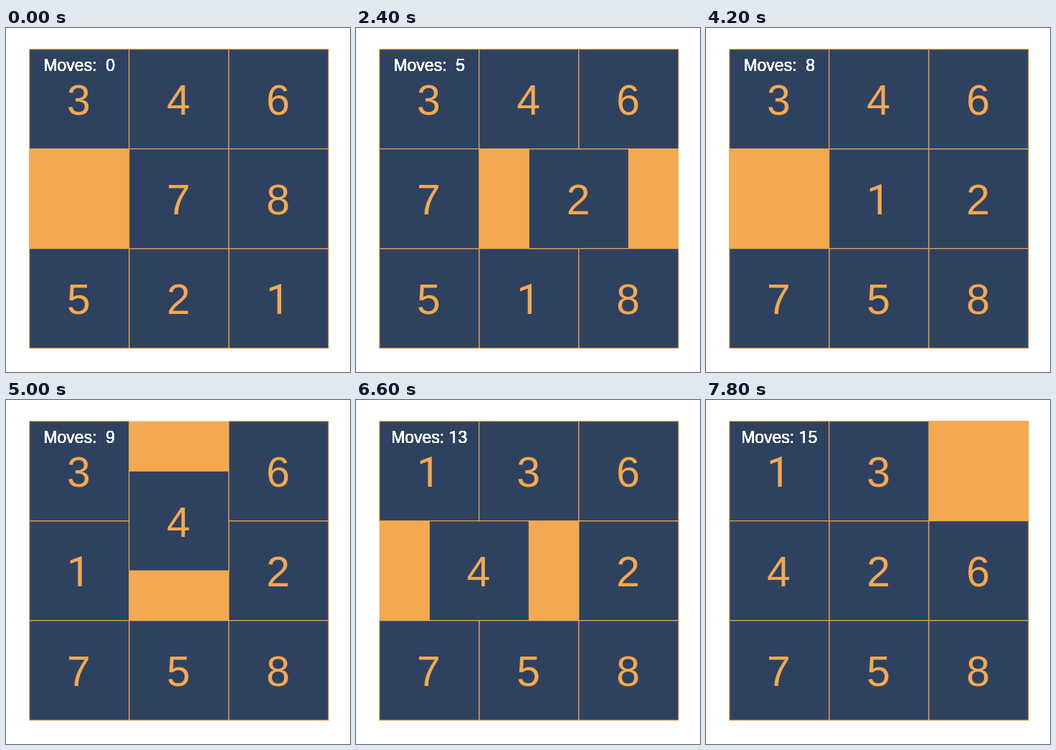
These frames come from a looping animation (480 px wide and 480 px high, 8000 ms). An HTML page with a canvas:

```html
<!DOCTYPE html>
<html lang="en">
<head>
<meta charset="utf-8">
<title>Sliding puzzle</title>
<style>
  html, body { margin: 0; width: 100%; height: 100%; overflow: hidden; background: #fff; }
  canvas { display: block; }
</style>
</head>
<body>
<canvas id="stage" width="480" height="480"></canvas>
<script>
const ctx = document.getElementById("stage").getContext("2d");
const ORANGE = "#f4a950", NAVY = "#2e4260";
const LEFT = 32.7, TOP = 29.6, CELL = 139.1;
const LOOP = 8000, STEP = 200;

// Tile 0 is the empty place; every move swaps it with the listed tile.
const START = [3, 4, 6, 0, 7, 8, 5, 2, 1];
const MOVES = [7, 2, 1, 8, 2, 1, 5, 7, 1, 4, 3, 1, 4, 2, 6];

const states = [START.map((_, tile) => START.indexOf(tile))];
for (const tile of MOVES) {
  const next = [...states.at(-1)];
  [next[0], next[tile]] = [next[tile], next[0]];
  states.push(next);
}

// Step at which a state is reached: moves take two or three steps.
const arrival = k => Math.round(2.625 * k + 0.1);

function elasticInOut(p) {
  if (p <= 0 || p >= 1) return p;
  const q = 2 * p - 1, w = 13 * Math.PI / 2;
  return p < 0.5
    ? 0.5 * Math.sin(w * 2 * p) * 2 ** (10 * q)
    : 0.5 * (Math.sin(-w * (q + 1)) * 2 ** (-10 * q) + 2);
}

// The counter shows the nearest state; exact ties go to the odd one.
function nearest(k, p) {
  if (p === 0.5) return k % 2 ? k : k + 1;
  return p < 0.5 ? k : k + 1;
}

// Centred text, with a footless "1".
function drawText(text, x, y, size) {
  const runs = text.split(/(1)/).filter(Boolean).map(run => {
    const font = `${size}px ${run === "1" ? "Roboto" : '"Liberation Sans"'}, sans-serif`;
    ctx.font = font;
    return { run, font, width: ctx.measureText(run).width };
  });
  x -= runs.reduce((sum, r) => sum + r.width, 0) / 2;
  for (const { run, font, width } of runs) {
    ctx.font = font;
    ctx.fillText(run, x, y);
    x += width;
  }
}

function drawStep(step) {
  let k = 0;
  while (k < MOVES.length && arrival(k + 1) <= step) k++;
  const p = (step - arrival(k)) / (arrival(k + 1) - arrival(k));
  const from = states[k], to = states[k + 1] || from, e = elasticInOut(p);
  const mix = (a, b) => a + (b - a) * e;
  const tiles = from.map((cell, tile) => ({
    tile,
    x: LEFT + CELL * mix(cell % 3, to[tile] % 3),
    y: TOP + CELL * mix(Math.floor(cell / 3), Math.floor(to[tile] / 3))
  }));

  ctx.fillStyle = "#fff";
  ctx.fillRect(0, 0, 480, 480);
  ctx.fillStyle = ORANGE;
  ctx.fillRect(LEFT, TOP, CELL * 3, CELL * 3);

  ctx.strokeStyle = ORANGE;
  ctx.lineWidth = 1.1;
  for (const { tile, x, y } of tiles) {
    ctx.fillStyle = tile ? NAVY : ORANGE;
    ctx.fillRect(x, y, CELL, CELL);
    ctx.strokeRect(x, y, CELL, CELL);
  }

  ctx.fillStyle = ORANGE;
  for (const { tile, x, y } of tiles.slice(1)) {
    drawText(String(tile), x + CELL / 2 - 0.8, y + CELL / 2 + 21.8, 59);
  }

  // Stacked passes give the label its heavy edges.
  ctx.fillStyle = "#fff";
  const label = "Moves: " + String(nearest(k, p)).padStart(2);
  for (let i = 0; i < tiles.length; i++) drawText(label, LEFT + CELL / 2, 59.5, 23);
}

const begin = performance.now();
let shown = -1;
function tick() {
  const step = Math.floor((performance.now() - begin) % LOOP / STEP);
  if (step !== shown) drawStep(shown = step);
  requestAnimationFrame(tick);
}
tick();
</script>
</body>
</html>
```
